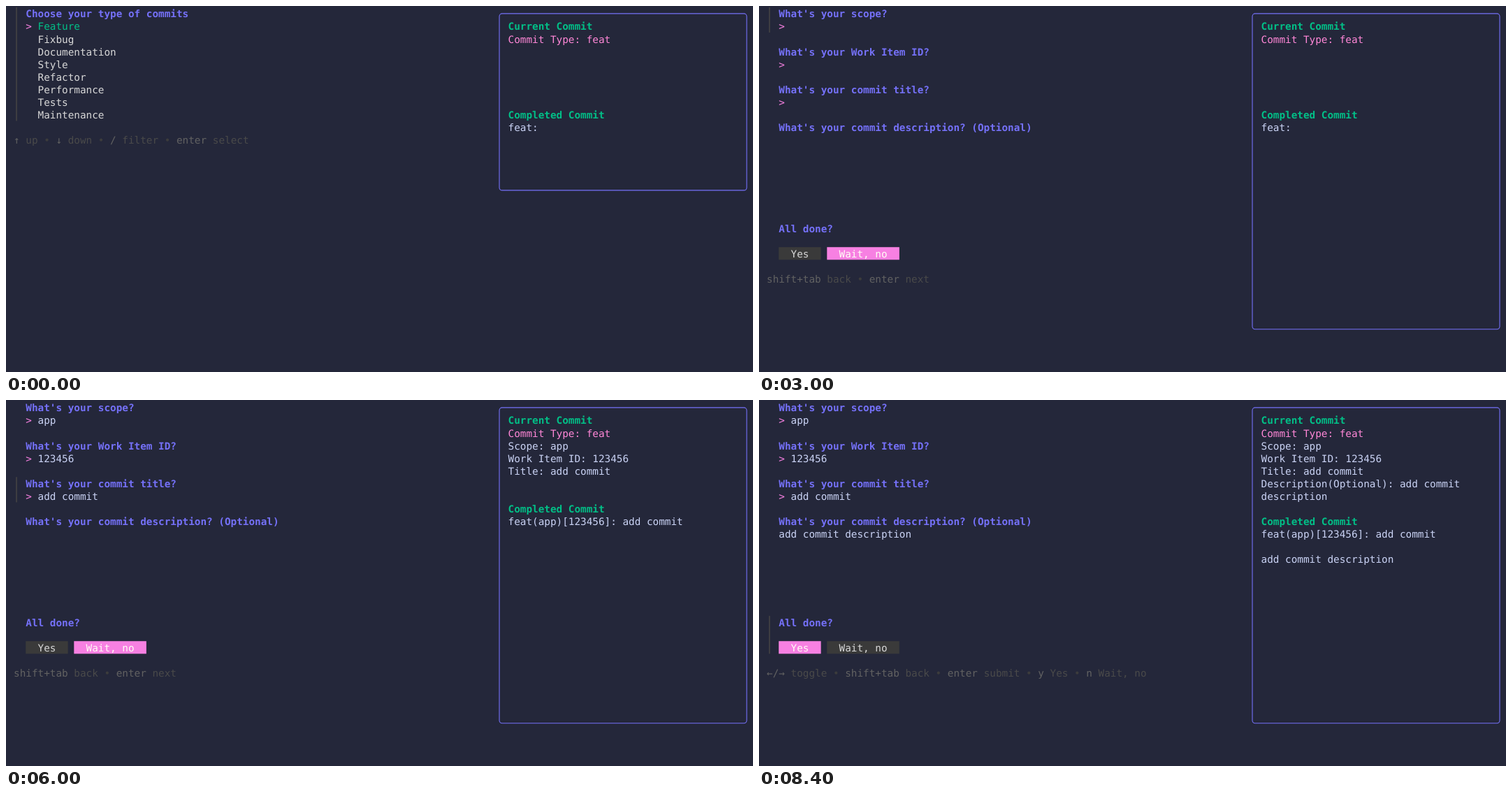
Recreate the animation shown at these times as an HTML page. Size 1069 by 524 pixels, loop 9 s.

```html
<!DOCTYPE html>
<html lang="en">
<head>
<meta charset="utf-8">
<title>Commit form in a terminal</title>
<style>
html, body { margin: 0; width: 100%; height: 100%; overflow: hidden; background: #24273a; }
svg { display: block; width: 1069px; height: 524px; }
text {
  font: 14.333px "DejaVu Sans Mono", "Noto Sans Mono", monospace;
  text-rendering: geometricPrecision;
  white-space: pre;
}
.bold { font-weight: 700; }
</style>
</head>
<body>
<svg id="stage" viewBox="0 0 1069 524"></svg>
<script>
const STEP = 600;
const LEFT = 11, TOP = 1.9, CW = 8.629, RH = 18.07, BASE = 14.5;
const C = {
  indigo: '#7571f9', green: '#02bf87', pink: '#f780e2', type: '#ff87d7',
  fg: '#cad3f5', option: '#d8d8d8', cream: '#fffdf5', bar: '#444444',
  off: '#3a3a3a', key: '#626262', desc: '#4a4a4a', sep: '#3c3c3c'
};
const OPTIONS = ['Feature', 'Fixbug', 'Documentation', 'Style', 'Refactor',
  'Performance', 'Tests', 'Maintenance'];
const TYPES = ['feat', 'fix', 'docs'];

// Help lines: key, description pairs
const HELP = {
  list: [['↑', 'up'], ['↓', 'down'], ['/', 'filter'], ['enter', 'select']],
  input: [['shift+tab', 'back'], ['enter', 'next']],
  area: [['alt+enter / ctrl+j', 'new line'], ['ctrl+e', 'open editor'],
    ['shift+tab', 'back'], ['enter', 'next']],
  confirm: [['←/→', 'toggle'], ['shift+tab', 'back'], ['enter', 'submit'],
    ['y', 'Yes'], ['n', 'Wait, no']]
};

// Focusable fields: first row, row count, help line
const FIELDS = [[0, 2, 'input'], [3, 2, 'input'], [6, 2, 'input'], [9, 7, 'area'], [17, 3, 'confirm']];

const STEPS = [
  { pick: 0 }, { pick: 1 }, { pick: 2 }, { pick: 1 }, { pick: 0 },
  { focus: 0, filled: 0 }, { focus: 0, filled: 1 },
  { focus: 1, filled: 1 }, { focus: 1, filled: 2 },
  { focus: 2, filled: 2 }, { focus: 2, filled: 3 },
  { focus: 3, filled: 3 }, { focus: 3, filled: 4 },
  { focus: 4, filled: 4 }, { focus: 4, filled: 4, yes: true }
];

const stage = document.getElementById('stage');
const colX = c => LEFT + c * CW;
const rowY = r => TOP + r * RH;

function add(parent, name, attrs) {
  const el = document.createElementNS('http://www.w3.org/2000/svg', name);
  for (const k in attrs) el.setAttribute(k, attrs[k]);
  return parent.appendChild(el);
}

function write(g, col, row, str, fill, bold) {
  if (!str) return;
  const el = add(g, 'text', { x: colX(col).toFixed(2), y: (rowY(row) + BASE).toFixed(2), fill });
  if (bold) el.setAttribute('class', 'bold');
  el.textContent = str;
}

function bar(g, row, rows) {
  add(g, 'rect', { x: 14.2, y: rowY(row), width: 1.6, height: rows * RH, fill: C.bar });
}

function help(g, row, name) {
  let col = 0;
  HELP[name].forEach(([key, desc], i) => {
    if (i) {
      write(g, col, row, '•', C.sep);
      col += 2;
    }
    write(g, col, row, key, C.key);
    col += key.length + 1;
    write(g, col, row, desc, C.desc);
    col += desc.length + 1;
  });
}

function button(g, col, label, on) {
  add(g, 'rect', {
    x: colX(col), y: rowY(19), width: (label.length + 4) * CW, height: RH,
    fill: on ? C.pink : C.off
  });
  write(g, col + 2, 19, label, on ? C.cream : C.option);
}

function panel(g, lastRow, type, filled) {
  add(g, 'rect', {
    x: 706, y: 10.9, width: 354, height: rowY(lastRow + 0.5) - 10.9, rx: 4,
    fill: 'none', stroke: C.indigo, 'stroke-width': 1.1
  });
  const line = (row, str, fill = C.fg, bold) => write(g, 82, row, str, fill, bold);
  line(1, 'Current Commit', C.green, true);
  line(2, 'Commit Type: ' + type, C.type);
  if (filled > 0) line(3, 'Scope: app');
  if (filled > 1) line(4, 'Work Item ID: 123456');
  if (filled > 2) line(5, 'Title: add commit');
  if (filled > 3) {
    line(6, 'Description(Optional): add commit');
    line(7, 'description');
    line(12, 'add commit description');
  }
  const row = filled > 3 ? 9 : 8;
  line(row, 'Completed Commit', C.green, true);
  line(row + 1, type + (filled > 0 ? '(app)' : '') + (filled > 1 ? '[123456]' : '') +
    ':' + (filled > 2 ? ' add commit' : ''));
}

function list(g, pick) {
  bar(g, 0, 9);
  write(g, 2, 0, 'Choose your type of commits', C.indigo, true);
  OPTIONS.forEach((name, i) => write(g, 4, i + 1, name, i === pick ? C.green : C.option));
  write(g, 2, pick + 1, '>', C.pink);
  help(g, 10, 'list');
  panel(g, 14, TYPES[pick], 0);
}

function form(g, { focus, filled, yes }) {
  const [row, rows, hint] = FIELDS[focus];
  bar(g, row, rows);
  [['scope', 'app'], ['Work Item ID', '123456'], ['commit title', 'add commit']]
    .forEach(([name, value], i) => {
      write(g, 2, i * 3, `What's your ${name}?`, C.indigo, true);
      write(g, 2, i * 3 + 1, '>', C.pink);
      if (filled > i) write(g, 4, i * 3 + 1, value, C.fg);
    });
  write(g, 2, 9, "What's your commit description? (Optional)", C.indigo, true);
  if (filled > 3) write(g, 2, 10, 'add commit description', C.fg);
  write(g, 2, 17, 'All done?', C.indigo, true);
  button(g, 2, 'Yes', yes);
  button(g, 10, 'Wait, no', !yes);
  help(g, 21, hint);
  panel(g, 25, 'feat', filled);
}

const scenes = STEPS.map(step => {
  const g = add(stage, 'g', { display: 'none' });
  if ('pick' in step) list(g, step.pick);
  else form(g, step);
  return g;
});

const start = performance.now();
let shown = -1;

function draw() {
  const t = Math.max(0, performance.now() - start);
  const now = Math.floor(t / STEP) % STEPS.length;
  if (now !== shown) {
    scenes.forEach((g, i) => g.setAttribute('display', i === now ? 'inline' : 'none'));
    shown = now;
  }
  requestAnimationFrame(draw);
}
draw();
</script>
</body>
</html>
```
